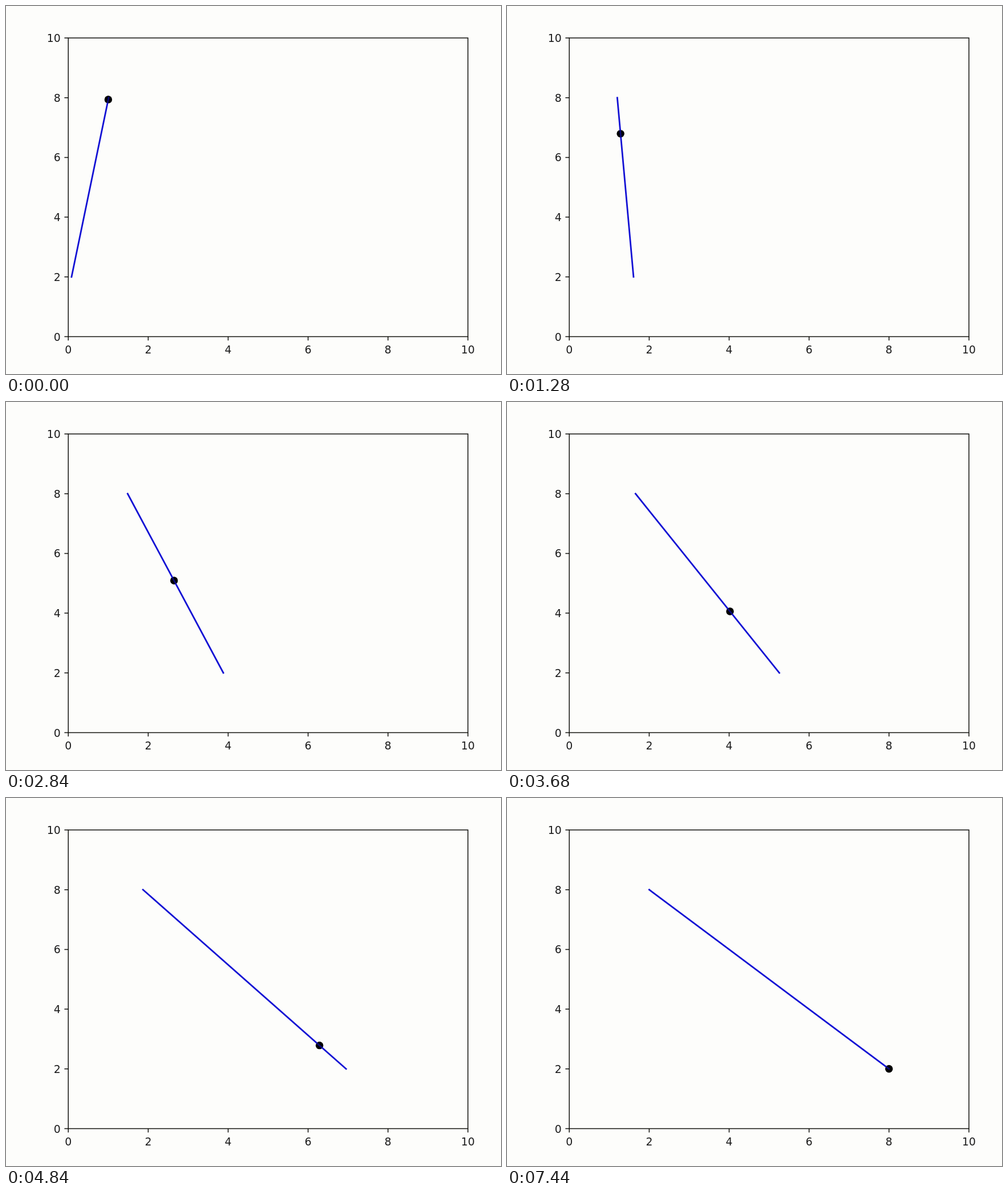
Animation of 868 by 645 pixels, one loop 7480 ms. Source, as an HTML page:

```html
<!DOCTYPE html>
<html lang="en">
<head>
<meta charset="utf-8">
<title>Sliding line</title>
<style>
  html, body { margin: 0; width: 100%; height: 100%; overflow: hidden; background: #fdfdfb; }
  svg { display: block; }
  text { font: 18.8px "DejaVu Sans", sans-serif; fill: #1a1a1a; }
  .axes { fill: none; stroke: #11110d; stroke-width: 1.5; }
  #line { stroke: #1210d4; stroke-width: 2.8; stroke-linecap: square; }
</style>
</head>
<body>
<svg width="868" height="645" viewBox="0 0 868 645">
  <rect class="axes" x="109.2" y="56" width="700.8" height="523.5"/>
  <path class="axes" id="ticks"/>
  <g id="labels"></g>
  <circle class="dot" r="6.7"/>
  <line id="line"/>
  <circle class="dot" r="6.3" opacity=".45"/>
</svg>
<script>
const LOOP = 7480, STEP = 40;
const px = x => 109.2 + 70.08 * x;
const py = y => 579.5 - 52.35 * y;
const mix = (a, b, s) => a + (b - a) * s;

const labels = document.getElementById('labels');
const line = document.getElementById('line');
const dots = document.querySelectorAll('.dot');

function set(el, attrs) {
  for (const name in attrs) el.setAttribute(name, attrs[name]);
}

function label(value, x, y, anchor) {
  const el = document.createElementNS('http://www.w3.org/2000/svg', 'text');
  set(el, { x, y, 'text-anchor': anchor });
  el.textContent = value;
  labels.append(el);
}

let ticks = '';
for (let v = 0; v <= 10; v += 2) {
  ticks += `M${px(v)} 579.5v6.8M109.2 ${py(v)}h-6.8`;
  label(v, px(v), 608.8, 'middle');
  label(v, 95.6, py(v) + 7, 'end');
}
set(document.getElementById('ticks'), { d: ticks });

// time in ms, progress, progress per second
const knots = [
  [0, 0.0102, 0.135],
  [1280, 0.201, 0.164],
  [2840, 0.485, 0.197],
  [3680, 0.657, 0.196],
  [4840, 0.869, 0.147],
  [6040, 1, 0]
];

function progress(t) {
  const i = knots.findIndex(k => k[0] > t);
  if (i < 0) return 1;
  const [t0, a, va] = knots[i - 1], [t1, b, vb] = knots[i];
  const h = (t1 - t0) / 1000, u = (t - t0) / (t1 - t0), w = 1 - u;
  return a * w * w * (1 + 2 * u) + b * u * u * (3 - 2 * u) + h * u * w * (va * w - vb * u);
}

function draw() {
  const t = performance.now() % LOOP;
  const s = progress(Math.floor(t / STEP) * STEP);
  const top = mix(1, 2, s), bottom = mix(0, 8, s);
  set(line, { x1: px(top), y1: py(8), x2: px(bottom), y2: py(2) });
  for (const dot of dots) set(dot, { cx: px(mix(top, bottom, s)), cy: py(mix(8, 2, s)) });
  requestAnimationFrame(draw);
}
draw();
</script>
</body>
</html>
```
